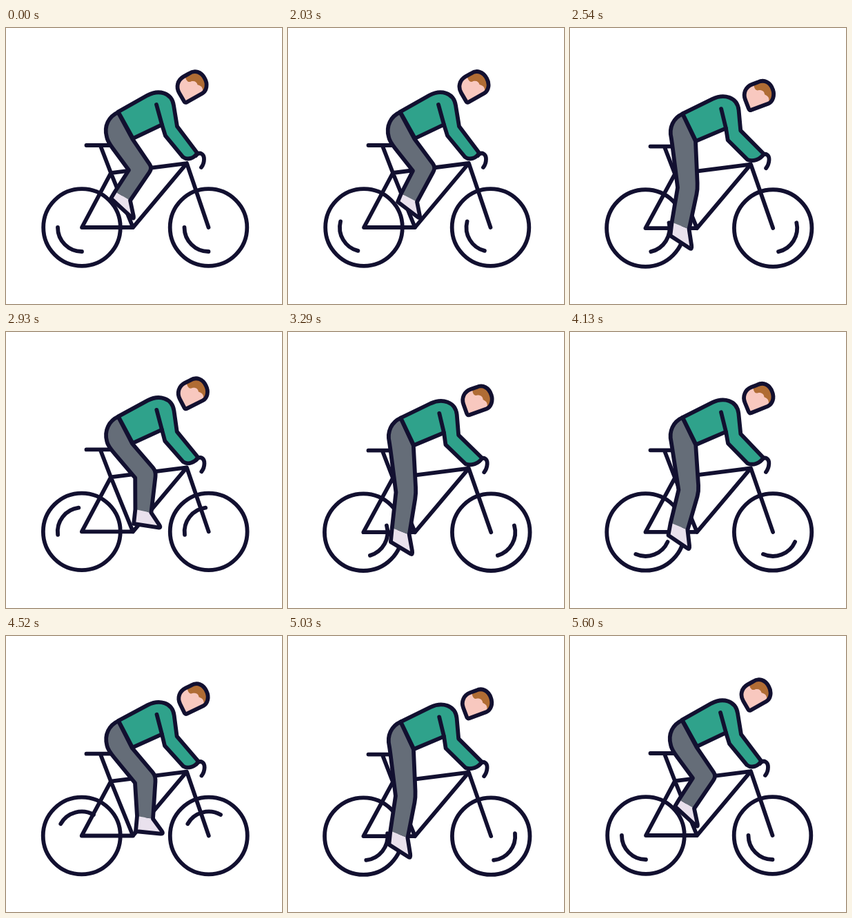
Animation, 400 px wide and 400 px high, one loop 5.66 s. Source, as an HTML page:

```html
<!DOCTYPE html>
<html lang="en">
<head>
<meta charset="utf-8">
<title>Cyclist</title>
<style>
  html, body { margin: 0; width: 100%; height: 100%; overflow: hidden; background: #fff; }
  svg { display: block; width: 100vw; height: 100vh; }
  .line { fill: none; stroke: #121030; stroke-width: 5.8; stroke-linecap: round; stroke-linejoin: round; }
</style>
</head>
<body>
<svg viewBox="0 0 400 400">
  <g class="line">
    <ellipse id="rearRim" ry="55.8"/>
    <ellipse id="frontRim" ry="55.8"/>
    <path id="rearArc" d="M-35 0A35 35 0 0 0 0 35"/>
    <path id="frontArc" d="M-35 0A35 35 0 0 0 0 35"/>
    <path id="frame"/>
  </g>
  <path id="foot" fill="#e9e1ed"/>
  <path id="pants" fill="#656d78"/>
  <path id="legLine" class="line"/>
  <path id="bar" class="line"/>
  <path id="torso" class="line" style="fill:#2fa28b"/>
  <path id="armLine" class="line"/>
  <g id="head">
    <path id="face" fill="#f8c8bf"/>
    <path fill="#b06c34" d="M-10 -15C-9 -9 -6 -4 -1 -7C4 -8 7 -6 8 -2C11 -1 14 0 15 3Q16 6 16 9.5C21.5 5 23 -3 18.5 -11C13.5 -20.5 4 -24 -4.5 -18Z"/>
    <path id="faceLine" class="line"/>
  </g>
</svg>
<script>
const LOOP = 5660, REST = 2030, STEP = 30, STEPS = 120, SLOW_AT = 87, CYCLE = 26;

// Leg poses: phase, then inner knee, outer knee, back ankle, front ankle, heel, toe
const poses = [
  [0,    178, 206, 212, 203, 158, 237, 180, 250, 152, 247, 186, 278],
  [1,    181, 207, 214, 202, 164, 240, 187, 252, 159, 252, 192, 277],
  [6,    187, 213, 217, 203, 190, 261, 213, 265, 188, 283, 229, 287],
  [12,   171, 226, 203, 222, 177, 282, 200, 288, 173, 301, 209, 312],
  [17.5, 156, 232, 185, 234, 149, 283, 174, 293, 147, 303, 179, 323],
  [22,   166, 218, 197, 219, 146, 257, 169, 268, 139, 270, 170, 294]
];

const $ = id => document.getElementById(id);
const draw = (id, d) => $(id).setAttribute('d', d);
const mix = (a, b, k) => [a[0] + (b[0] - a[0]) * k, a[1] + (b[1] - a[1]) * k];

// Steady pace, then slowing down to the full number of turns
function travel(n, rate, total) {
  if (n <= SLOW_AT) return rate * n;
  const rest = total - rate * SLOW_AT;
  return total - rest * Math.pow((STEPS - n) / (STEPS - SLOW_AT), 1.3);
}

function keyAt(i) {
  const len = poses.length, turn = Math.floor(i / len);
  const pose = poses[i - turn * len];
  return { at: pose[0] + turn * CYCLE, v: pose };
}

// Smooth cyclic curve through the poses
function legPoints(phase) {
  let i = poses.length - 1;
  while (poses[i][0] > phase) i--;
  const [a, b, c, d] = [-1, 0, 1, 2].map(k => keyAt(i + k));
  const h = c.at - b.at, u = (phase - b.at) / h;
  const value = k => {
    const m0 = (c.v[k] - a.v[k]) / (c.at - a.at) * h;
    const m1 = (d.v[k] - b.v[k]) / (d.at - b.at) * h;
    const p = b.v[k], q = c.v[k];
    return p + u * (m0 + u * (3 * (q - p) - 2 * m0 - m1 + u * (2 * (p - q) + m0 + m1)));
  };
  return [1, 3, 5, 7, 9, 11].map(k => [value(k), value(k + 1)]);
}

function drawBike(bob, turn) {
  const y = 289 + 1.4 * bob, rear = 110 - 0.8 * bob, front = 293.5 + 0.9 * bob;
  for (const [name, x] of [['rear', rear], ['front', front]]) {
    const rim = $(name + 'Rim');
    rim.setAttribute('cx', x);
    rim.setAttribute('cy', y);
    rim.setAttribute('rx', 55.8 + 0.6 * bob);
    $(name + 'Arc').setAttribute('transform', `translate(${x} ${y}) rotate(${turn})`);
  }
  const d = 2 * bob;
  draw('frame', `M116.5 ${170 + d}H150M137 ${171 + d}L152 ${210 + d}L184 ${y}H${rear}
    L152 ${210 + d}L262 ${196 + d}L184 ${y}M262 ${196 + d}L${front} ${y}`);
}

function drawLeg(bob, phase) {
  const [inner, outer, back, front, heel, toe] = legPoints(phase);
  const waist = [162.5 + bob, 122 + 3 * bob], hip = [183.5 - 2 * bob, 161 + 4 * bob];
  const seat = [146 + bob, 158 + 2 * bob], bend = [147 + bob, 164 + 2 * bob];
  const thigh = `M${waist}C${149 + bob},${128 + 3 * bob} ${141.5 + 2 * bob},${142 + 3 * bob} ${seat}
    Q${bend} ${mix(bend, inner, 0.25)}L${inner}L${back}`;
  const sole = `L${heel}L${mix(heel, toe, 0.88)}Q${toe} ${mix(toe, front, 0.22)}L${front}`;
  const shin = `L${mix(outer, front, 0.13)}Q${outer} ${mix(outer, hip, 0.13)}L${hip}Z`;
  draw('foot', `M${back}${sole}Z`);
  draw('pants', `${thigh}L${front}${shin}`);
  draw('legLine', thigh + sole + shin);
}

function drawBody(bob) {
  const p = (x, y, dx, dy) => `${x + dx * bob},${y + dy * bob} `;
  draw('bar', 'M' + p(275, 185, 3, 1.5) + 'C' + p(281, 178, 3, 1.5) + p(287, 183, 2.5, 1.5) +
    p(287, 190, 2, 1.5) + 'Q' + p(287, 197, 1.5, 1.5) + p(283, 202, 1.5, 1.5));
  draw('torso', 'M' + p(162.5, 121.5, 1, 3.5) + 'L' + p(205, 97.5, 2, 7) +
    'C' + p(221, 89, 3, 8) + p(240, 93, 3, 9) + p(243, 112, 2, 9) +
    'L' + p(248, 142.5, -1, 8) + 'L' + p(277, 181, 5, 2) +
    'C' + p(273, 189, 4, 2) + p(263, 192, 3, 3) + p(256.5, 187, 1, 5) +
    'L' + p(231, 156, -3, 8.5) + 'L' + p(226, 140, 0, 7) + 'L' + p(184, 160, -2, 5) + 'Z');
  draw('armLine', 'M' + p(218, 111, 1.5, 8) + 'L' + p(226, 140, 0, 7));
  $('head').setAttribute('transform',
    `translate(${269.5 + 5.7 * bob} ${84 + 17 * bob}) rotate(${12 * bob})`);
}

function render(ms) {
  const t = ms % LOOP;
  const n = t < REST ? 0 : Math.min(STEPS, Math.floor((t - REST) / STEP) + 1);
  const phase = travel(n, 1, 4 * CYCLE) % CYCLE;
  const bob = (1 - Math.cos(2 * Math.PI * (phase - 0.8) / CYCLE)) / 2;
  drawBike(bob, travel(n, 14.28, 1440));
  drawLeg(bob, phase);
  drawBody(bob);
}

const skull = 'M-7.5 23.3L15 10.5C21.5 6.5 23 -3 18.5 -11C13.5 -20.5 4 -24 -4.5 -18' +
  'L-12.5 -13.5C-21 -8.5 -23.5 1.5 -18.5 10L-11.5 22Q-10 24.8 -7.5 23.3Z';
draw('face', skull);
draw('faceLine', skull);

const start = performance.now();
function tick() {
  render(performance.now() - start);
  requestAnimationFrame(tick);
}
tick();
</script>
</body>
</html>
```
